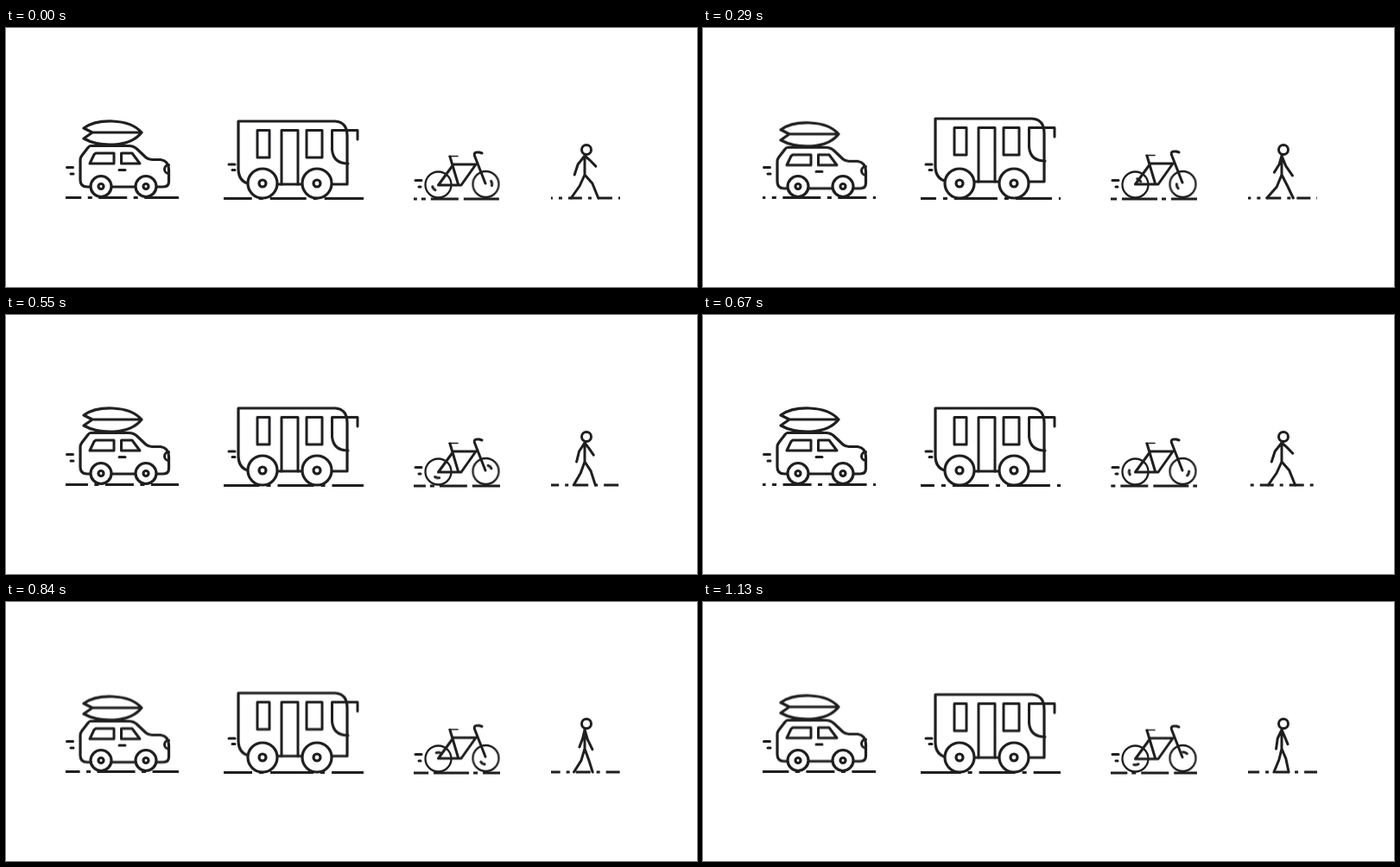
An HTML page that plays this animation: 800x300 px, repeating every 1.23 s.

```html
<!DOCTYPE html>
<html lang="en">
<head>
<meta charset="utf-8">
<title>Ways to travel</title>
<style>
  html, body { margin: 0; width: 100%; height: 100%; overflow: hidden; background: #fff; }
  svg {
    --cycle: 615ms;
    display: block; width: 800px; height: 300px;
    stroke: #1f1e20; stroke-width: 3; stroke-linecap: round; stroke-linejoin: round;
    fill: none;
  }
  .solid { fill: #fff; stroke-width: 3.2; }
  .thin { stroke-width: 1.6; }

  /* One dash pattern passes in each cycle. */
  .road {
    stroke-linecap: butt;
    stroke-dasharray: var(--dashes);
    animation: pass var(--cycle) var(--pace, linear) infinite;
  }
  .braking { --pace: cubic-bezier(.333, .48, .667, .813); }
  @keyframes pass {
    from { stroke-dashoffset: calc(var(--from) * 1px); }
    to { stroke-dashoffset: calc((var(--from) + var(--period)) * 1px); }
  }
  #car-road { --dashes: 5 7.5 33 7.5 5 7.5 44 7.5; --from: -26; --period: 117; }
  #bus-road { --dashes: 5 8 42 8 5 8 50 8; --from: -41; --period: 134; }
  #bike-road { --dashes: 5 6 32 6 41 5; --from: -9; --period: 95; }
  #footpath { --dashes: 4 7 16 7 4 7 17 7; --from: -9; --period: 69; }

  .bob { animation: bob var(--cycle) -595ms linear infinite; }
  @keyframes bob {
    0%, 13%, 87%, 100% { transform: translateY(0); }
    37%, 63% { transform: translateY(var(--bob)); }
  }

  .glint { animation: spin var(--cycle) linear infinite; }
  .rear .glint { animation-delay: -256ms; }
  @keyframes spin {
    from { transform: rotate(-10deg); }
    to { transform: rotate(350deg); }
  }

  /* Spine, arms, legs: bent stride, feet together, straight stride, together. */
  #limbs { animation: walk var(--cycle) -589ms infinite; }
  @keyframes walk {
    0%, 100% {
      d: path("M670 147L670 170M658 170L662 158L670 148L676 153L683 160M654 197L664 183L670 170L679 180L686 197");
      animation-timing-function: cubic-bezier(.6, 0, 1, .6);
    }
    25%, 75% {
      d: path("M670 147L670 170M670 170L669 158L670 148L670 158L670 170M669 197L670 183L670 170L670 183L669 197");
      animation-timing-function: cubic-bezier(0, .4, .4, 1);
    }
    50% {
      d: path("M670 147L670 170M661 167L667 158L670 148L675 160L683 171M652 197L664 184L670 170L677 183L684 197");
      animation-timing-function: cubic-bezier(.6, 0, 1, .6);
    }
  }
</style>
</head>
<body>
<svg viewBox="0 0 800 300">
  <defs>
    <g id="car-wheel" class="solid"><circle r="12"/><circle r="3"/></g>
    <g id="bus-wheel" class="solid"><circle r="17"/><circle r="4"/></g>
  </defs>

  <path class="road braking" id="car-road" d="M69 196.5H200"/>
  <path class="road braking" id="bus-road" d="M252 197.5H414"/>
  <path class="road" id="bike-road" d="M472 198H572"/>
  <path class="road" id="footpath" d="M631 197H711"/>

  <!-- Speed lines -->
  <path d="M70.500 161.500H77.500M75 169H78M258 158H265M262 164.500H265M474 176.500H481M478 184H480"/>

  <g class="bob" style="--bob: 1.8px">
    <path class="solid" d="M98 136.500H142Q148 136.500 152 140.500L162 150Q165 152.500 169 152.500H179Q188.500 154 188.500 164V178Q188.500 184 182 184H94Q86 184 86 176V153Q86 150 88 147.500L95 138.500Q96.500 136.500 98 136.500Z"/>
    <path class="solid" d="M90 116C105 105 142 104 157 121H100ZM100 121H157C143 139 108 138 90 128Z"/>
    <path d="M104 145H125V157H97L102 146.500ZM133.500 145H146L155 157H133.500ZM131 164.500H138M188.500 158.500A5 5 0 0 0 188.500 168.500"/>
  </g>
  <use href="#car-wheel" x="110" y="183.500"/>
  <use href="#car-wheel" x="162" y="183.500"/>

  <g class="bob" style="--bob: -3px">
    <path class="solid" d="M269 108H381Q395 109 395 125V181H284Q269 179 269 163Z"/>
    <path d="M291 118.500H305V150H291ZM319 181V118.500H338V181M348 118.500H366V150H348ZM407 129V118.500H377.500V141Q379 157 396 157"/>
  </g>
  <use href="#bus-wheel" x="297" y="180"/>
  <use href="#bus-wheel" x="360" y="180"/>

  <g class="rear" transform="translate(500.500 181.500)">
    <circle class="solid" style="stroke-width: 2.3" r="15"/>
    <path class="glint" d="M6.700 -2.500A7.200 7.200 0 0 1 6.700 2.500"/>
  </g>
  <g transform="translate(555.500 181)">
    <circle class="solid" style="stroke-width: 2.3" r="15"/>
    <path class="glint" d="M6.700 -2.500A7.200 7.200 0 0 1 6.700 2.500"/>
  </g>
  <g class="bob" style="--bob: -1px">
    <path d="M514 149L523.500 181M500.500 182H527L544 158H518ZM555 180L542.500 148Q541.500 144 545 144H548L551 145"/>
    <path class="thin" d="M513 148.500H523"/>
  </g>

  <circle cx="672" cy="141" r="5.500"/>
  <path id="limbs" d="M670 147V170"/>
</svg>
</body>
</html>
```
